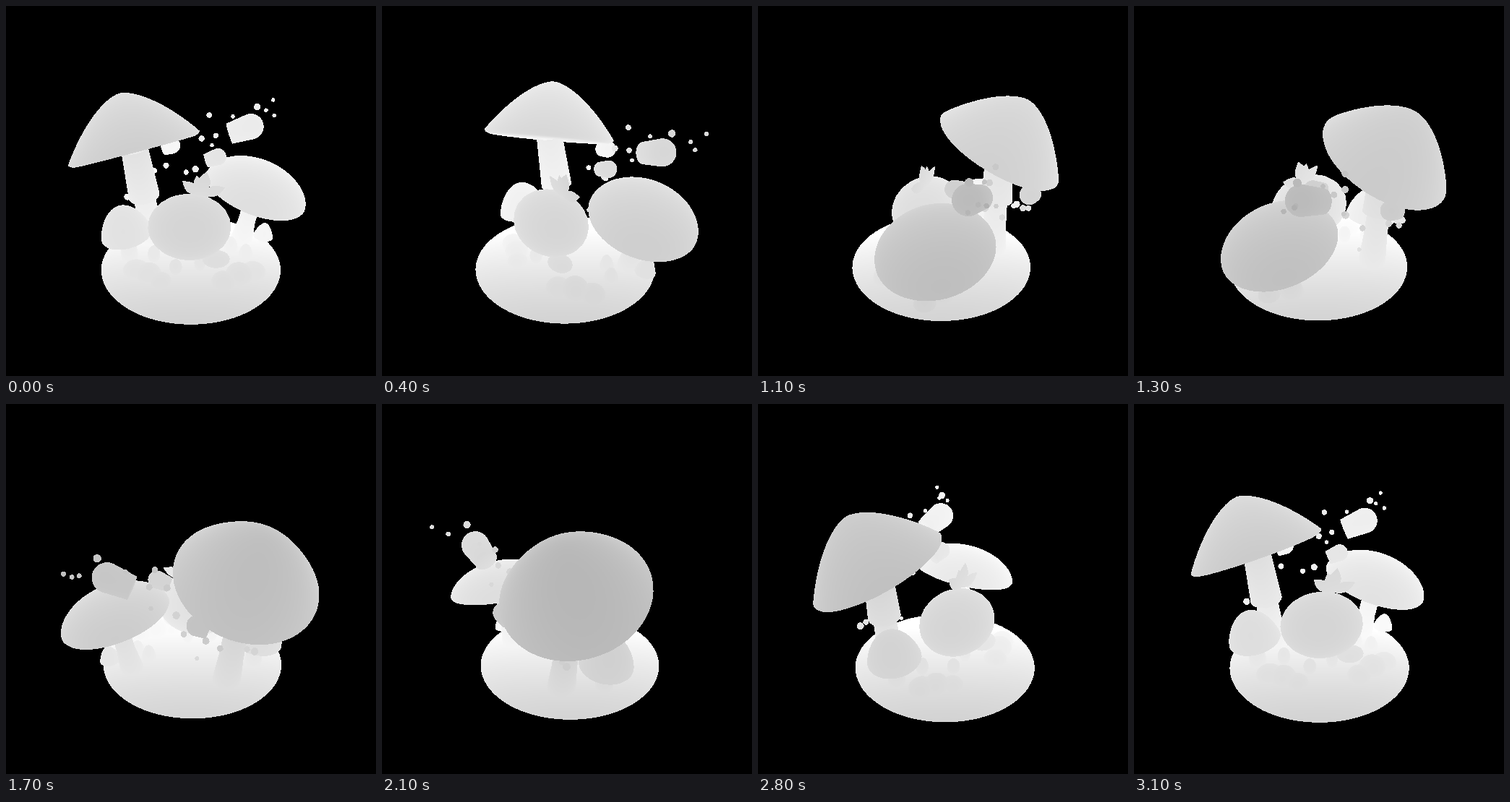
Write an HTML page with a canvas that moves like this. It is 512 px wide and 512 px high and loops after 3.2 s.

```html
<!DOCTYPE html>
<html>
<head>
<meta charset="utf-8">
<style>
  html, body { margin: 0; height: 100%; overflow: hidden; background: #000; }
  canvas { display: block; width: 100vw; height: 100vh; }
</style>
</head>
<body>
<canvas id="stage" width="512" height="512"></canvas>
<script>
// Depth map of a mushroom island on a turntable: near is grey, far is white.
const SIZE = 512, STEPS = 32, STEP_MS = 100;
const CAMERA = 850, PITCH = 29 * Math.PI / 180;
const COS_P = Math.cos(PITCH), SIN_P = Math.sin(PITCH);
const GROUND = -110;
const ctx = document.getElementById('stage').getContext('2d');
const image = ctx.createImageData(SIZE, SIZE);
const pixels = new Uint32Array(image.data.buffer);
const depths = new Float32Array(SIZE * SIZE);
const meshes = [];

const range = (n, f) => Array.from({ length: n + 1 }, (_, i) => f(i / n));

// Point at a distance from the turning axis; 0 degrees faces the viewer.
function polar(radius, degrees, y) {
  const a = degrees * Math.PI / 180;
  return [radius * Math.sin(a), y, radius * Math.cos(a)];
}

// Surface of revolution; profile is a list of [radius, distance along axis].
function revolve(profile, base, axis, flat = 1, sides = 40) {
  const length = Math.hypot(...axis);
  const [ux, uy, uz] = axis.map(v => v / length);
  const n = Math.hypot(ux, uy);
  const e1 = [uy / n, -ux / n, 0];
  const e2 = [-uz * e1[1], uz * e1[0], ux * e1[1] - uy * e1[0]];
  const points = [];
  for (const [r, h] of profile) {
    for (let i = 0; i < sides; i++) {
      const a = i / sides * 2 * Math.PI;
      const c = r * Math.cos(a), s = r * Math.sin(a) * flat;
      points.push([ux, uy, uz].map((u, k) => base[k] + u * h + e1[k] * c + e2[k] * s));
    }
  }
  meshes.push({ points, sides });
}

function ellipsoid(center, rx, ry = rx, rz = rx, sides = 28) {
  const profile = range(14, t => [rx * Math.sin(t * Math.PI), -ry * Math.cos(t * Math.PI)]);
  revolve(profile, center, [0, 1, 0], rz / rx, sides);
}

function cap(center, radius, height, lean, leanSide, bulge, round) {
  const tilt = lean * Math.PI / 180, lip = radius * .05;
  const axis = polar(Math.sin(tilt), leanSide, Math.cos(tilt));
  const under = [[0, -lip], [radius * .93, -lip], [radius * .98, -lip * .6]];
  const dome = range(24, t => {
    const r = Math.cos(t * Math.PI / 2);
    return [radius * r, height * Math.pow(Math.max(0, 1 - Math.pow(r, bulge)), round)];
  });
  revolve([...under, ...dome], center, axis, 1, 64);
}

function stem(base, top, profile) {
  const axis = top.map((v, i) => v - base[i]);
  const length = Math.hypot(...axis);
  revolve(profile.map(([r, t]) => [r, t * length]), base, axis);
}

function chunk(center, radius, length) {
  const end = length / 2;
  const tip = range(8, t => [
    radius * Math.cos(t * Math.PI / 2),
    end - radius + radius * Math.sin(t * Math.PI / 2)
  ]);
  revolve([[0, -end], [radius * .82, -end], ...tip], center, [1, .36, 0]);
}

function leaf(base, dx, dy) {
  const length = Math.hypot(dx, dy);
  revolve(range(10, t => [length * .24 * Math.sin(t * Math.PI), t * length]), base, [dx, dy, 0], .3, 16);
}

function buildScene() {
  // Island
  const rim = range(30, t => {
    const a = (t - .5) * Math.PI, s = Math.sin(a);
    return [131 * Math.pow(Math.max(0, Math.cos(a)), .6), s * (s < 0 ? 18 : 10)];
  });
  revolve(rim, polar(4, 350, -119), [0, 1, 0], 1, 90);

  // Tall mushroom with a skirt
  const tall = polar(91, 242, 46);
  cap(tall, 95, 79, 27, 214, 1.6, .96);
  stem(polar(77, 230, GROUND - 3), tall, [[20, 0], [17, .25], [16, .5], [23, .5], [21, .75], [19, 1]]);

  // Broad mushroom
  const broad = polar(108, 118, -25);
  cap(broad, 77, 39, 17, 89, 2, .6);
  stem(polar(90, 122, GROUND - 3), broad, [[17, 0], [13, .4], [13, 1]]);

  // Small mushrooms
  const small = polar(93, 270, -71);
  cap(small, 37, 46, 10, 270, 2, .72);
  stem(polar(90, 270, GROUND - 4), small, [[13, 0], [10, 1]]);
  const tiny = polar(118, 112, -103);
  cap(tiny, 15, 23, 8, 112, 1.7, .8);
  stem(polar(116, 112, -124), tiny, [[8, 0], [4, 1]]);
  cap([80, -112, -6], 11, 20, 0, 0, 2, .7);
  cap([59, -110, -20], 11, 22, 0, 0, 2, .7);

  // Round creature with leaves and feet
  ellipsoid(polar(30, 355, -39), 57, 45, 47, 48);
  ellipsoid([34, -80, 48], 19, 11, 15);
  ellipsoid([-22, -98, 42], 9, 12);
  ellipsoid([-54, -97, 12], 9, 14);
  ellipsoid([12, -98, 32], 8, 14);
  const crown = [13, 6, 22];
  leaf(crown, -25, 22);
  leaf(crown, 7, 36);
  leaf(crown, 32, 12);
  leaf(crown, -6, 30);

  // Bushes on the ground
  ellipsoid([-78, -108, 36], 19, 15, 17);
  ellipsoid([-60, -107, 46], 18, 16, 17);
  ellipsoid([-42, -110, 60], 15, 13, 15);
  ellipsoid([44, -109, 62], 17, 15, 17);
  ellipsoid([66, -105, 51], 19, 18, 18);
  ellipsoid([87, -109, 39], 18, 15, 17);

  // Floating chunks
  chunk(polar(123, 139, 55), 19, 52);
  chunk(polar(54, 140, 32), 12, 30);
  chunk(polar(120, 195, 16), 13, 28);

  // Floating crumbs: x, y, z, radius
  [
    [26, 75, -94, 4], [61, 71, -99, 3], [96, 86, -99, 5], [112, 72, -121, 3],
    [124, 82, -138, 3], [124, 66, -115, 3], [36, 46, -86, 4], [15, 44, -80, 4.5],
    [31, 24, -100, 3], [-39, -12, -104, 4.5], [-57, -21, -104, 4], [-8, -16, -89, 4],
    [6, -1, -70, 5], [-21, -67, -67, 3], [-97, -46, -66, 5], [-87, -44, -66, 4]
  ].forEach(([x, y, z, r]) => ellipsoid([x, y, z], r, r, r, 10));
}

function fillTriangle(a, b, c) {
  const area = (b[0] - a[0]) * (c[1] - a[1]) - (b[1] - a[1]) * (c[0] - a[0]);
  if (Math.abs(area) < 1e-6) return;
  const left = Math.max(0, Math.ceil(Math.min(a[0], b[0], c[0])));
  const right = Math.min(SIZE - 1, Math.floor(Math.max(a[0], b[0], c[0])));
  const top = Math.max(0, Math.ceil(Math.min(a[1], b[1], c[1])));
  const bottom = Math.min(SIZE - 1, Math.floor(Math.max(a[1], b[1], c[1])));
  for (let y = top; y <= bottom; y++) {
    for (let x = left; x <= right; x++) {
      const v = ((x - a[0]) * (c[1] - a[1]) - (y - a[1]) * (c[0] - a[0])) / area;
      const w = ((b[0] - a[0]) * (y - a[1]) - (b[1] - a[1]) * (x - a[0])) / area;
      if (v < 0 || w < 0 || v + w > 1) continue;
      const depth = a[2] + v * (b[2] - a[2]) + w * (c[2] - a[2]);
      const i = y * SIZE + x;
      if (depth > depths[i]) depths[i] = depth;
    }
  }
}

function render(step) {
  const turn = step / STEPS * 2 * Math.PI;
  const cos = Math.cos(turn), sin = Math.sin(turn);
  const project = ([x, y, z]) => {
    const across = x * cos - z * sin, toward = x * sin + z * cos;
    const depth = toward * COS_P + y * SIN_P;
    const scale = CAMERA / (CAMERA - depth);
    return [256 + across * scale, 256 - (y * COS_P - toward * SIN_P) * scale, depth];
  };
  depths.fill(-Infinity);
  for (const { points, sides } of meshes) {
    const p = points.map(project);
    for (let i = 0; i < p.length - sides; i++) {
      const next = i % sides === sides - 1 ? i + 1 - sides : i + 1;
      fillTriangle(p[i], p[next], p[i + sides]);
      fillTriangle(p[next], p[next + sides], p[i + sides]);
    }
  }
  for (let i = 0; i < pixels.length; i++) {
    const gray = depths[i] === -Infinity ? 0 : Math.min(255, Math.round(226 - .25 * depths[i]));
    pixels[i] = 0xff000000 | gray * 0x010101;
  }
  ctx.putImageData(image, 0, 0);
}

buildScene();
let shown = -1;
const start = performance.now();
function tick() {
  const step = Math.floor((performance.now() - start) / STEP_MS) % STEPS;
  if (step !== shown) render(shown = step);
  requestAnimationFrame(tick);
}
tick();
</script>
</body>
</html>
```
